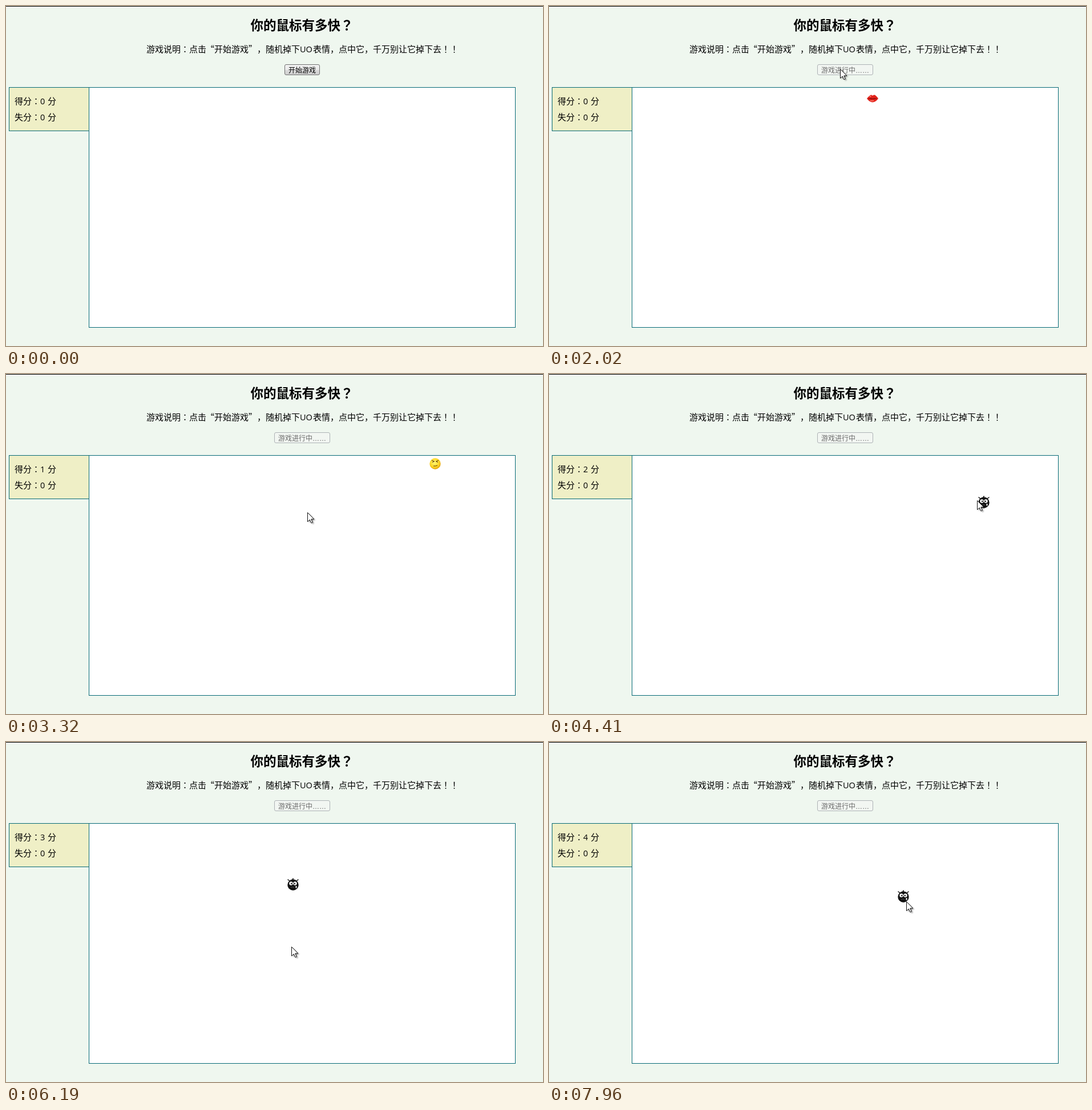
Animation of 941 by 595 pixels, one loop 7.99 s. Source, as an HTML page:

```html
<!DOCTYPE html>
<html lang="zh-CN">
<head>
<meta charset="utf-8">
<style>
html, body { margin: 0; width: 100%; height: 100%; overflow: hidden; background: #eff7ef; }
svg { display: block; }
text { font: 350 15px "Noto Sans CJK SC", "Noto Sans CJK", sans-serif; white-space: pre; }
/* Japanese forms centre the colon and the question and exclamation marks */
.mid { font-family: "Noto Sans CJK JP", "Noto Sans CJK", sans-serif; }
.latin { font-family: "Open Sans", "Noto Sans", sans-serif; font-size: 14.5px; font-weight: 400; }
.title { font-size: 22.5px; font-weight: bold; }
#label { font-size: 12px; }
#dots { font: 12px "Liberation Sans", sans-serif; }
.box { stroke: #066a76; }
</style>
</head>
<body>
<svg width="941" height="595" viewBox="0 0 941 595">
  <defs>
    <linearGradient id="normal" x2="0" y2="1">
      <stop offset="0" stop-color="#f3f3f3"/><stop offset=".5" stop-color="#e9e9e9"/>
      <stop offset=".5" stop-color="#dcdcdc"/><stop offset="1" stop-color="#cecece"/>
    </linearGradient>
    <linearGradient id="hover" x2="0" y2="1">
      <stop offset="0" stop-color="#eaf6fd"/><stop offset=".5" stop-color="#d9f0fc"/>
      <stop offset=".5" stop-color="#bee6fd"/><stop offset="1" stop-color="#a7d9f5"/>
    </linearGradient>
    <linearGradient id="pressed" x2="0" y2="1">
      <stop offset="0" stop-color="#dbeef8"/><stop offset=".5" stop-color="#c4e5f6"/>
      <stop offset=".5" stop-color="#98d1ef"/><stop offset="1" stop-color="#72b6dc"/>
    </linearGradient>
    <radialGradient id="skin" cx=".45" cy=".4" r=".65">
      <stop offset="0" stop-color="#fff87a"/><stop offset=".65" stop-color="#fcd421"/>
      <stop offset="1" stop-color="#d98c08"/>
    </radialGradient>
    <g id="lips">
      <path d="M-10 0Q-5-6-2.500-6.500Q-1-6.500 0-5Q1-6.500 3-6.500Q6-6 10 0Q5 6.500 0 6.500Q-5 6.500-10 0Z" fill="#e3231b"/>
      <path d="M-9 0Q-3-1.500 0-.3Q4-1.500 9 0Q4 1.500 0 1Q-4 1.500-9 0Z" fill="#8e0c0c"/>
      <path d="M-4 3.500Q-1 4.500 2 3.500M-5-3L-2.500-4.500" fill="none" stroke="#ff9a8c" stroke-width="1.200"/>
    </g>
    <g id="smirk">
      <circle r="9.700" fill="url(#skin)"/>
      <path d="M-6-6L-1.500-4L-5-2.500M6-6L1.500-4L5-2.500M-3 4Q1 4.500 4 3" fill="none" stroke="#5a3508"/>
    </g>
    <g id="helmet">
      <circle cy=".500" r="9.700" fill="url(#skin)"/>
      <path d="M-10.500 1Q-10-10.300 0-10.300Q10-10.300 10.500 1Q6 3 3-.5Q-2 3-10.500 1Z" fill="#14601a"/>
      <path d="M-6-5L-2-7M1-5L5-6M-5-1L0-3M5-2L8-3" stroke="#3c8a2c" stroke-width="1.600"/>
      <path d="M-5 4H-2M2 4H5" stroke="#4a2d08" stroke-width="1.200"/>
      <path d="M3 6L8.500 9.500" stroke="#6b3410" stroke-width="2.500"/>
    </g>
    <g id="smile">
      <circle r="9.700" fill="url(#skin)"/>
      <path d="M-4-4V-1M4-4V-1M-5 3Q0 8 5 3" fill="none" stroke="#5a3508" stroke-width="1.400"/>
    </g>
    <g id="dark">
      <path d="M-6-6L-9.500-8.500M6-6L9.500-8.500M-1-8L.5-10.500" stroke="#111" stroke-width="1.500"/>
      <circle cy="1" r="9.700" fill="#111"/>
      <circle cx="-3.500" cy="-1.500" r="3.200" fill="#fff"/><circle cx="3.500" cy="-1.500" r="3.200" fill="#fff"/>
      <circle cx="-2.800" cy="-1.300" r="1.200"/><circle cx="2.800" cy="-1.300" r="1.200"/>
      <path d="M5.500 3V6.500" stroke="#fff" stroke-width="2"/>
      <path d="M-4 5.500Q-1 4 2 5.500" fill="none" stroke="#555"/>
    </g>
    <path id="arrow" d="M.5.500V16.500L4.300 13L6.800 18.800L9.300 17.800L6.800 12H11.800Z"/>
    <filter id="blur" x="-50%" y="-50%" width="200%" height="200%"><feGaussianBlur stdDeviation="1"/></filter>
  </defs>

  <rect width="941" height="595" fill="#eff7ef"/>
  <rect width="941" height="1"/>
  <text class="title" x="428.500" y="42">你的鼠标有多快<tspan class="mid" lang="ja">？</tspan></text>
  <g transform="translate(0 81)">
    <text x="246">游戏说明<tspan class="mid" lang="ja">：</tspan>点击</text>
    <text x="350">“</text><text x="365">开始游戏</text><text x="425">”</text>
    <text x="440">，</text><text x="455">随机掉下</text>
    <text class="latin" x="515">UO</text>
    <text x="538">表情，点中它，千万别让它掉下去<tspan class="mid" lang="ja">！！</tspan></text>
  </g>
  <rect id="button" y="102.500" height="18" rx="2.500"/>
  <text id="label" y="116.500"><tspan id="words"></tspan><tspan id="dots"></tspan></text>

  <rect class="box" x="5.500" y="142.500" width="140" height="76" fill="#efefc6"/>
  <rect class="box" x="145.500" y="142.500" width="747" height="420" fill="#fff"/>
  <g transform="translate(15 172)">
    <text>得分<tspan class="mid" lang="ja">：</tspan></text><text id="score" class="latin" x="45">0</text><text x="58">分</text>
  </g>
  <g transform="translate(15 200)">
    <text>失分<tspan class="mid" lang="ja">：</tspan></text><text class="latin" x="45">0</text><text x="58">分</text>
  </g>

  <use id="face"/>
  <g id="cursor">
    <use href="#arrow" x="2.500" y="2" opacity=".4" filter="url(#blur)"/>
    <use href="#arrow" fill="#fff" stroke="#111"/>
  </g>
</svg>
<script>
const LOOP = 7990;
const $ = id => document.getElementById(id);
const set = (el, attrs) => { for (const k in attrs) el.setAttribute(k, attrs[k]); };

// start and hit in ms, duration of the whole fall, centre x
const drops = [
  { shape: 'lips', start: 1710, hit: 2590, fall: 3900, x: 567 },
  { shape: 'smirk', start: 3112, hit: 4340, fall: 4615, x: 752 },
  { shape: 'helmet', start: 4837, hit: 5515, fall: 2160, x: 498 },
  { shape: 'smile', start: 6468, hit: 7246, fall: 2216, x: 624 }
];

// time, x, y of the pointer tip
const path = [
  [560, 941, 499], [1310, 510, 110], [2050, 510, 110], [2530, 567, 190],
  [2650, 567, 190], [3320, 528, 242], [3410, 528, 242], [3700, 600, 261],
  [4160, 750, 221], [4440, 750, 221], [5070, 600, 321], [5190, 541, 317],
  [5480, 499, 246], [5950, 499, 246], [6190, 500, 358], [6250, 500, 358],
  [6740, 600, 305], [7200, 626, 279], [LOOP, 626, 279]
];

// states of the button: from time, left, width, fill, stroke, text colour
const states = [
  [0, 488.5, 61, 'url(#normal)', '#707070', '#000'],
  [1250, 488.5, 61, 'url(#hover)', '#3c7fb1', '#000'],
  [1440, 488.5, 61, 'url(#pressed)', '#2c628b', '#000'],
  [1740, 470.5, 97, '#f2f6f2', '#adb2b5', '#6a6a6a']
];

function drawButton(t) {
  const [from, x, width, fill, stroke, ink] = states.findLast(s => t >= s[0]);
  const playing = from === 1740;
  set($('button'), { x, width, fill, stroke });
  set($('label'), { x: x + 6.5, fill: ink });
  $('words').textContent = playing ? '游戏进行中' : '开始游戏';
  $('dots').textContent = playing ? '……' : '';
}

function drawFace(t) {
  const d = drops.findLast(d => t >= d.start);
  $('face').style.display = d ? '' : 'none';
  $('score').textContent = drops.filter(d => t >= d.hit).length;
  if (!d) return;
  const hit = t >= d.hit;
  const p = (Math.min(t, d.hit) - d.start) / d.fall;
  const y = 155 + 210 * (1 - Math.cos(Math.PI * p));
  const shake = hit ? 10 * Math.sin((t - d.hit) / 280 * 2 * Math.PI) : 0;
  set($('face'), {
    href: '#' + (hit ? 'dark' : d.shape),
    transform: `translate(${Math.round(d.x + shake)} ${Math.round(y)})`
  });
}

function drawCursor(t) {
  const i = path.findIndex(p => t < p[0]);
  $('cursor').style.display = i > 0 ? '' : 'none';
  if (i < 1) return;
  const [t0, x0, y0] = path[i - 1], [t1, x1, y1] = path[i];
  const u = (t - t0) / (t1 - t0), e = u * u * (3 - 2 * u);
  const x = Math.round(x0 + (x1 - x0) * e), y = Math.round(y0 + (y1 - y0) * e);
  set($('cursor'), { transform: `translate(${x} ${y})` });
}

const begin = performance.now();
function frame() {
  const t = (performance.now() - begin) % LOOP;
  drawButton(t);
  drawFace(t);
  drawCursor(t);
  requestAnimationFrame(frame);
}
frame();
</script>
</body>
</html>
```
